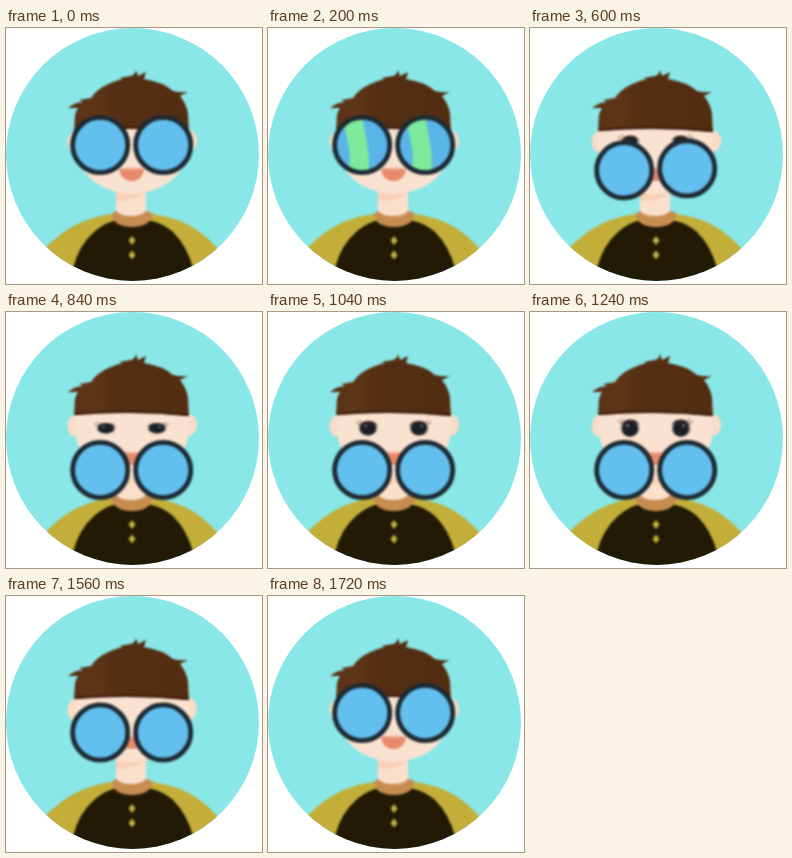
An HTML page that plays this animation: 256 by 256 pixels, repeating every 1.84 s.

```html
<!DOCTYPE html>
<html lang="en">
<head>
<meta charset="utf-8">
<title>Glasses</title>
<style>
  html, body { margin: 0; width: 100%; height: 100%; overflow: hidden; background: #fff; }
  svg { display: block; width: 100vw; height: 100vh; }
</style>
</head>
<body>
<svg viewBox="0 0 256 256">
  <defs>
    <clipPath id="disc"><circle cx="126.5" cy="126.5" r="126.5"/></clipPath>
    <clipPath id="inner"><circle r="26.5"/></clipPath>
    <filter id="soft" x="0" y="0" width="256" height="270" filterUnits="userSpaceOnUse" color-interpolation-filters="sRGB">
      <feGaussianBlur stdDeviation="1"/>
    </filter>
    <linearGradient id="hairTone">
      <stop offset="0" stop-color="#573016"/>
      <stop offset=".2" stop-color="#5f3617"/>
      <stop offset=".4" stop-color="#552f13"/>
      <stop offset="1" stop-color="#522d12"/>
    </linearGradient>
    <g id="eye">
      <ellipse rx="10" ry="8.5" fill="#c9bbb0"/>
      <circle r="8.3" fill="#1c2025"/>
      <circle cx="-2.5" cy="-3" r="1.3" fill="#8d959d"/>
      <path d="M-10-2Q-6-10 1-9Q7-9 10-3Q5-7 0-7Q-6-7-10-2Z" fill="#35251f"/>
      <path d="M-8-5L-12-8M-6-7L-9-10" stroke="#66524a"/>
    </g>
    <g id="lens">
      <circle class="glass" r="27.5"/>
      <g clip-path="url(#inner)">
        <path class="shine" d="M-5-30Q0-12 3 5Q4 18 2 30H22Q24 12 20-5Q18-18 15-30Z" fill="#7eea9c"/>
      </g>
      <circle r="27.6" fill="none" stroke="#1d2a33" stroke-width="4.8"/>
    </g>
  </defs>
  <g clip-path="url(#disc)">
    <path d="M0 0H256V256H0Z" fill="#8ae7e7"/>
    <g filter="url(#soft)">
      <path d="M30 270V230Q53 203 78 193Q94 187 107 186H146Q161 188 174 193Q199 203 219 230V270Z" fill="#c2ae38"/>
      <path d="M67 270V240Q73 217 88 204Q97 196 107 193H146Q158 196 167 204Q181 218 187 240V270Z" fill="#221a05"/>
      <path d="M105 187Q108 183 111 183H140Q145 183 147 187Q143 199 126 199Q109 199 105 187Z" fill="#c68d50"/>
      <path d="M110 155H140V183Q136 188 125 188Q114 188 110 183Z" fill="#fae0cb"/>
      <path d="M110 163Q125 170 140 160V165Q128 174 110 173Z" fill="#f9d2b6"/>
      <path d="M126 208l3.5 4.5-3.5 4.5-3.5-4.5zM126 222.500l3.500 4.500-3.500 4.500-3.500-4.500z" fill="#c0b03f"/>
      <ellipse cx="70" cy="114" rx="8.5" ry="11" fill="#fadbc6"/>
      <ellipse cx="182.5" cy="113" rx="8.5" ry="11" fill="#fadbc6"/>
      <path d="M69 92V118C70 149 101 166 126 166C151 166 182 149 183 118V92Z" fill="#fae2d0"/>
      <path d="M113 141Q126 139 138 141Q136 153 126 153Q115 153 113 141Z" fill="#e8896c"/>
      <path d="M114 141Q126 139 137 141Q126 144 114 141Z" fill="#f2a58b"/>
      <g id="leftEye"><use href="#eye"/></g>
      <g id="rightEye"><use href="#eye" transform="scale(-1 1)"/></g>
      <path d="M68 103L69 87Q70 83 72 80L62 80Q69 74 77 74L73 72L85 70Q93 57 117 51L113 50L125 48Q129 47 130 42L132 48L140 44L138 51Q157 54 167 63Q175 65 182 64L174 68Q181 77 182 86L183 104Q126 98 68 103Z" fill="url(#hairTone)"/>
      <path d="M69 102Q126 97 183 103" fill="none" stroke="#3f200e" stroke-width="2.5"/>
      <g id="glasses">
        <use href="#lens" x="-31.5"/>
        <use href="#lens" x="31.5"/>
      </g>
    </g>
  </g>
</svg>
<script>
  const LOOP = 1840, STEP = 40;
  const $ = s => document.querySelector(s);
  const part = (t, a, b) => Math.min(1, Math.max(0, (t - a) / (b - a)));
  const ease = p => p * p * (3 - 2 * p);
  const blink = (t, mid) => ease(1 - Math.min(1, Math.abs(t - mid) / 110));

  function draw(t) {
    const fall = part(t, 420, 740);
    const drop = 41 * (ease(fall) - ease(part(t, 1400, 1710)));
    const tilt = -1.8 * Math.sin(Math.PI * fall);
    $('#glasses').setAttribute('transform', `translate(125.7 ${117 + drop}) rotate(${tilt})`);

    const sweep = part(t, 0, 480);
    $('.shine').setAttribute('transform', `translate(${-50 + 82 * sweep})`);
    $('.glass').setAttribute('fill', sweep > 0 && sweep < 1 ? '#5ab4e8' : '#62bfee');

    const open = 1 - 0.9 * Math.max(blink(t, 900), blink(t, 1120));
    $('#leftEye').setAttribute('transform', `translate(100 116.5) scale(1 ${open})`);
    $('#rightEye').setAttribute('transform', `translate(151 116.5) scale(1 ${open})`);
  }

  const start = performance.now();
  function tick() {
    const t = (performance.now() - start) % LOOP;
    draw(Math.floor(t / STEP) * STEP);
    requestAnimationFrame(tick);
  }
  tick();
</script>
</body>
</html>
```
